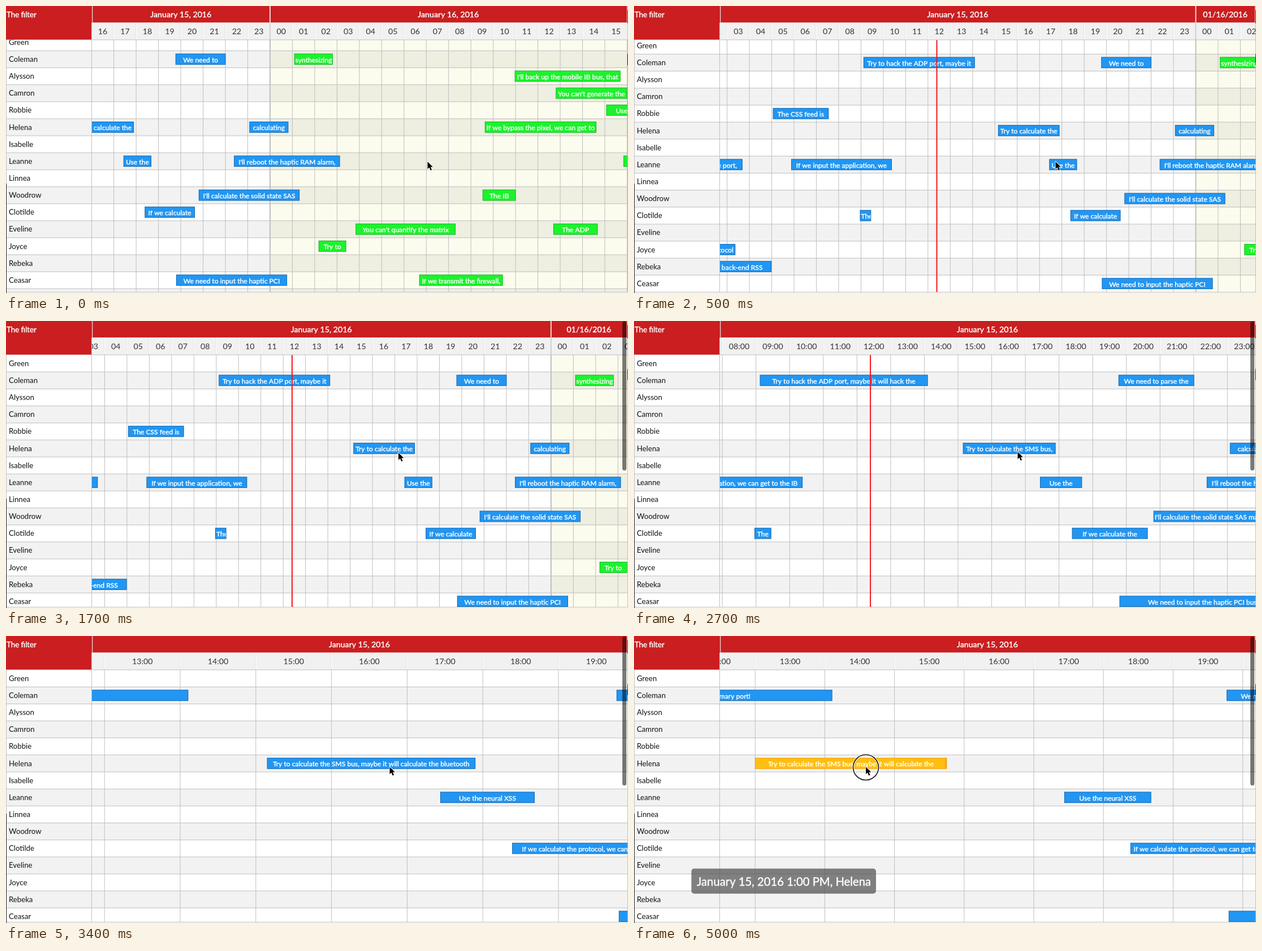
These frames come from a looping animation (1100x509 px, 5.1 s). An HTML page with a canvas:

```html
<!DOCTYPE html>
<html lang="en">
<head>
<meta charset="utf-8">
<title>Scheduler</title>
<style>
html, body { margin: 0; width: 100%; height: 100%; overflow: hidden; background: #fff; }
canvas { display: block; }
</style>
</head>
<body>
<canvas id="stage" width="1100" height="509"></canvas>
<script>
const ctx = document.getElementById('stage').getContext('2d');
const W = 1100, H = 509, LOOP = 5100, STEP = 100;
const LEFT = 152, RIGHT = 1099, TOP = 60, BOTTOM = 507, ROW = 30.15, BAR = 19.8;
const PIVOT_X = 679, PIVOT_HOUR = 16.775, NOW = 12.4;
const FONT = 'Lato, "Open Sans", sans-serif', LABEL = 12.1;
const RED = '#ca1e20', LINE = '#bfbfbf', SEAM = '#ead4d4';

const names = ['Green', 'Coleman', 'Alysson', 'Camron', 'Robbie', 'Helena', 'Isabelle', 'Leanne',
  'Linnea', 'Woodrow', 'Clotilde', 'Eveline', 'Joyce', 'Rebeka', 'Ceasar', ''];

// row, start hour, hours, label; anything starting on the 16th is green
const tasks = [
  [1, 9.12, 4.99, 'Try to hack the ADP port, maybe it will hack the primary port!'],
  [1, 19.77, 2.25, 'We need to parse the bluetooth PNG card!'],
  [1, 25.09, 1.73, 'synthesizing the'],
  [2, 34.97, 4.74, "I'll back up the mobile IB bus, that should"],
  [3, 36.81, 3.2, "You can't generate the driver"],
  [4, 5.06, 2.5, 'The CSS feed is down,'],
  [4, 39.07, 1.9, 'Use the neural'],
  [5, 23.08, 1.75, "calculating the microchip won't"],
  [5, 33.63, 5, 'If we bypass the pixel, we can get to'],
  [7, -0.45, 4.15, "You can't quantify the port, without"],
  [7, 5.88, 4.51, 'If we input the application, we can get to the IB capacitor'],
  [7, 17.44, 1.248, 'Use the neural XSS'],
  [7, 22.39, 4.75, "I'll reboot the haptic RAM alarm, that should input"],
  [7, 39.84, 3, 'We need to'],
  [9, -0.07, 1.95, 'Use the PNG monitor'],
  [9, 20.81, 4.52, "I'll calculate the solid state SAS matrix, that should"],
  [9, 33.53, 1.49, 'The IB panel'],
  [10, 8.96, 0.5, 'The'],
  [10, 18.39, 2.25, 'If we calculate the protocol, we can get to the SAS microchip'],
  [11, 27.84, 4.48, "You can't quantify the matrix without"],
  [11, 36.7, 1.99, 'The ADP circuit'],
  [12, 0.51, 2.87, 'parsing the protocol'],
  [12, 26.18, 1.24, 'Try to parse'],
  [13, 1.25, 3.75, 'Use the back-end RSS bandwidth'],
  [14, 19.8, 4.97, 'We need to input the haptic PCI bus,'],
  [14, 30.69, 3.75, 'If we transmit the firewall, we']
];
const moved = { row: 5, start: 15.15, hours: 2.755,
  label: 'Try to calculate the SMS bus, maybe it will calculate the bluetooth matrix' };

const BLUE = ['#2196f3', '#1668b0'], GREEN = ['#1bf32c', '#18b526'], AMBER = ['#ffbf10', '#fb9f14'];

// keyframed values: [time, value]
const PAN = [[0, -497.5], [200, 92.4], [300, 92.4], [400, 67], [500, 29], [600, 6], [700, -0.6],
  [2700, -0.6], [2800, 0]];
const SCROLL = [[300, 11], [500, 5], [700, 0]];
const ZOOM = [[2600, 39.47], [2700, 59.55], [2900, 92], [3100, 126], [3200, 136], [3300, 137],
  [3400, 133.8], [3500, 127], [3600, 123.2]];
const MOUSE_X = [[700, 745.5], [900, 732], [1200, 698], [1300, 694], [2200, 694], [2400, 678.5],
  [4200, 678.5], [4300, 668], [4400, 625], [4600, 515], [4700, 470], [4800, 441], [4900, 421], [5000, 410]];
const MOUSE_Y = [[700, 276], [900, 265], [1200, 237], [1300, 233.5], [2200, 233.5], [2400, 232]];

function at(keys, t) {
  if (t <= keys[0][0]) return keys[0][1];
  for (let i = 1; i < keys.length; i++) {
    const [t0, a] = keys[i - 1], [t1, b] = keys[i];
    if (t <= t1) return a + (b - a) * (t - t0) / (t1 - t0);
  }
  return keys[keys.length - 1][1];
}

function rect(x, y, w, h, color) {
  ctx.fillStyle = color;
  ctx.fillRect(x, y, w, h);
}

function clipped(x, y, w, h, draw) {
  ctx.save();
  ctx.beginPath();
  ctx.rect(x, y, w, h);
  ctx.clip();
  draw();
  ctx.restore();
}

function text(s, x, y, size, color, align = 'left') {
  ctx.font = size + 'px ' + FONT;
  ctx.fillStyle = color;
  ctx.textAlign = align;
  ctx.textBaseline = 'alphabetic';
  y += size * 0.36;
  ctx.fillText(s, x, y);
  if (color === '#fff') {
    // light text on colour reads slightly heavier
    ctx.strokeStyle = color;
    ctx.lineWidth = 0.4;
    ctx.lineJoin = 'round';
    ctx.strokeText(s, x, y);
  }
}

function firstLine(label, width) {
  ctx.font = LABEL + 'px ' + FONT;
  const words = label.split(' ');
  let line = words[0];
  for (const word of words.slice(1)) {
    if (ctx.measureText(line + ' ' + word).width > width) break;
    line += ' ' + word;
  }
  return line;
}

function bar(x, y, w, label, [fill, edge], handle) {
  if (x > RIGHT || x + w < LEFT) return;
  rect(x, y, w, BAR, edge);
  rect(x + 1, y + 1, w - (handle ? 4 : 2), BAR - 2, fill);
  const line = firstLine(label, w - 2);
  const wide = ctx.measureText(line).width;
  clipped(x + 1, y, w - 2, BAR, () =>
    text(line, x + Math.max(2, (w - wide) / 2), y + 11, LABEL, '#fff'));
}

function rows(scroll) {
  clipped(0, TOP, W, BOTTOM - TOP, () => {
    names.forEach((name, i) => {
      const y = TOP + i * ROW - scroll;
      rect(0, Math.round(y), RIGHT, 31, i % 2 ? '#f2f2f2' : '#fff');
      text(name, 5, y + 15, 13.2, '#111');
    });
  });
}

function grid(view) {
  clipped(LEFT, TOP, RIGHT - LEFT, BOTTOM - TOP, () => {
    const next = view.x(24);
    if (next < RIGHT) {
      ctx.globalCompositeOperation = 'multiply';
      rect(next, TOP, RIGHT - next, BOTTOM - TOP, '#fbfbee');
      ctx.globalCompositeOperation = 'source-over';
    }
    for (let h = 0; h <= 40; h++) {
      const thick = h === 24 ? 2 : 1;
      rect(view.x(h) + 0.3 - thick / 2, TOP, thick, BOTTOM - TOP, LINE);
    }
  });
  clipped(0, TOP, W, BOTTOM - TOP, () => {
    for (let i = 1; i < 16; i++) rect(0, TOP + i * ROW - view.scroll - 0.3, RIGHT, 1, LINE);
  });
}

function day(from, to, long, short) {
  const a = Math.max(LEFT, from), b = Math.min(RIGHT - 1, to);
  if (b - a < 2) return;
  const s = b - a < 150 ? short : long;
  ctx.font = '14.2px ' + FONT;
  const wide = ctx.measureText(s).width;
  clipped(a, 0, b - a, 30, () =>
    text(s, Math.max(a + 1, (a + b - wide) / 2), 15, 14.2, '#fff'));
}

function header(view) {
  rect(LEFT, 0, RIGHT - LEFT, 29.5, RED);
  rect(LEFT, 29.5, RIGHT - LEFT, 30.5, '#f1f1f1');
  const next = view.x(24);
  clipped(LEFT, 0, RIGHT - LEFT, TOP, () => {
    for (let h = 0; h <= 40; h++) {
      const x = view.x(h), hour = String(h % 24).padStart(2, '0');
      rect(x - 0.8, 30, 1, 30, '#e2e2e2');
      rect(x + 0.2, 30, 1, 30, '#fff');
      text(view.w > 50 ? hour + ':00' : hour, x + view.w / 2 + 0.4, 45, 14.2, '#333', 'center');
    }
    rect(next - 0.7, 0, 2, 30, SEAM);
    rect(next - 0.7, 30, 2, 30, '#d0d0d0');
  });
  day(view.x(0), next, 'January 15, 2016', '01/15/2016');
  day(next, view.x(48), 'January 16, 2016', '01/16/2016');
  rect(LEFT, 59.5, RIGHT - LEFT, 1, LINE);
  rect(0, 0, LEFT, 59.7, RED);
  text('The filter', 1, 15, 13.3, '#fff');
  rect(152, 0, 1.3, 29.5, SEAM);
  rect(151, 29.5, 1, BOTTOM - 29.5, LINE);
  rect(RIGHT - 1, 0, 1, 29.5, SEAM);
}

function frame() {
  rect(0, BOTTOM, W, 1, LINE);
  rect(RIGHT, 0, 1, BOTTOM, LINE);
  rect(0, TOP, 1, BOTTOM - TOP, LINE);
  rect(0, 315, 1, H - 315, '#222');
  rect(RIGHT, 7, 1, 24, '#333');
  rect(RIGHT, 85, 1, 20, '#333');
}

function pill(x, y, w, h, r, color) {
  ctx.beginPath();
  ctx.roundRect(x, y, w, h, r);
  ctx.fillStyle = color;
  ctx.fill();
}

function tooltip(start) {
  const hour = Math.floor(start), min = String(Math.round((start - hour) * 60)).padStart(2, '0');
  pill(101.5, 412.5, 326.5, 44.5, 5, 'rgba(88,88,88,.76)');
  text(`January 15, 2016 ${(hour + 11) % 12 + 1}:${min} ${hour < 12 ? 'AM' : 'PM'}, Helena`,
    265, 435.5, 20.25, '#fff', 'center');
}

function ring(x, y) {
  ctx.beginPath();
  ctx.arc(x, y, 22.5, 0, Math.PI * 2);
  ctx.strokeStyle = 'rgba(255,255,255,.75)';
  ctx.lineWidth = 4;
  ctx.stroke();
  ctx.strokeStyle = '#111';
  ctx.lineWidth = 1.6;
  ctx.stroke();
}

function cursor(x, y) {
  ctx.save();
  ctx.translate(x, y);
  ctx.beginPath();
  [[0, 0], [0, 13], [3, 10.2], [5.2, 15.6], [7.6, 14.6], [5.4, 9.4], [9.4, 9.4]]
    .forEach(p => ctx.lineTo(...p));
  ctx.closePath();
  ctx.lineJoin = 'round';
  ctx.lineWidth = 1.8;
  ctx.strokeStyle = '#fff';
  ctx.stroke();
  ctx.fillStyle = '#000';
  ctx.fill();
  ctx.restore();
}

function draw(t) {
  const w = at(ZOOM, t), pan = at(PAN, t), scroll = at(SCROLL, t);
  const mx = at(MOUSE_X, t), my = at(MOUSE_Y, t);
  const view = { w, scroll, x: h => PIVOT_X + pan + (h - PIVOT_HOUR) * w };
  const dragging = t >= 4300;
  const start = dragging ? Math.round((moved.start + (mx - 678.5) / w) * 4) / 4 : moved.start;
  const rowY = row => TOP + row * ROW - scroll + 5.25;

  rect(0, 0, W, H, '#fff');
  rows(scroll);
  grid(view);
  clipped(LEFT, TOP, RIGHT - LEFT, BOTTOM - TOP, () => {
    for (const [row, from, hours, label] of tasks) {
      bar(view.x(from), rowY(row), hours * w, label, from < 24 ? BLUE : GREEN);
    }
    const held = t >= 4000;
    bar(view.x(start), rowY(moved.row), moved.hours * w, moved.label, held ? AMBER : BLUE, held);
    rect(view.x(NOW) - 0.8, TOP, 2, BOTTOM - TOP, '#f3151c');
  });
  header(view);
  frame();
  if (t >= 1000) pill(1090, 1, 7.2, 264, 3.6, 'rgba(0,0,0,.52)');
  if (dragging) {
    tooltip(start);
    ring(mx, my + 1);
  }
  cursor(mx, my);
}

function tick() {
  const t = performance.now() % LOOP;
  draw(Math.floor(t / STEP) * STEP);
  requestAnimationFrame(tick);
}
tick();
</script>
</body>
</html>
```
